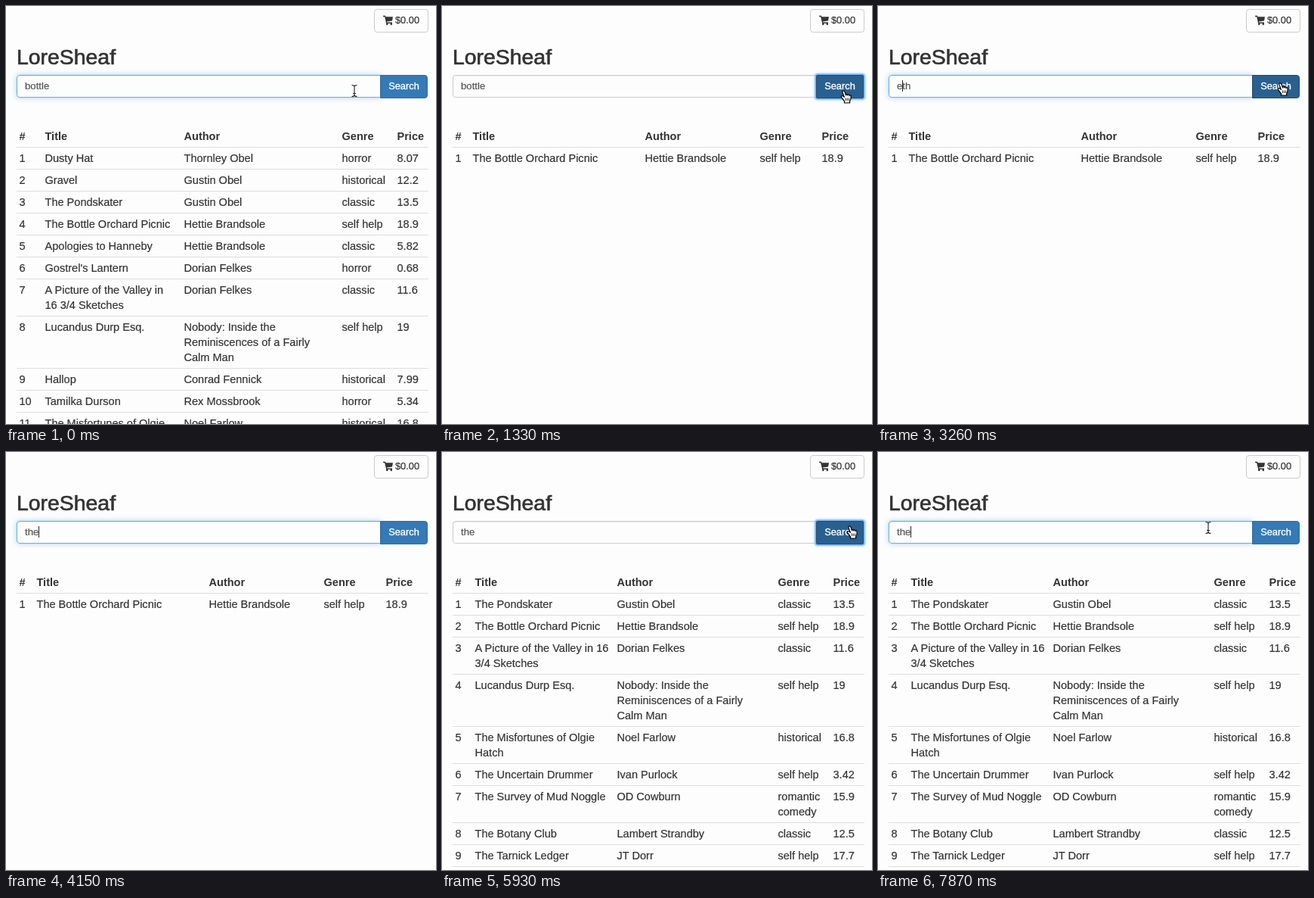
An HTML page that plays this animation: 569x552 px, repeating every 8 s.

```html
<!DOCTYPE html>
<html lang="en">
<head>
<meta charset="utf-8">
<title>Book search</title>
<style>
  html, body { margin: 0; width: 100%; height: 100%; overflow: hidden; background: #fdfdfd; }
  body { position: relative; color: #333; font: 14.55px/20px "Liberation Sans", Arial, sans-serif; -webkit-text-stroke: .2px; }
  body > * { position: absolute; box-sizing: border-box; }
  h1 { left: 14px; top: 51px; margin: 0; font-size: 28.4px; line-height: 32px; font-weight: 400; -webkit-text-stroke: .7px; }
  #cart { left: 487px; top: 4px; width: 72px; height: 31px; border: 1px solid #ccc; border-radius: 4px; font-size: 12.8px; line-height: 28px; padding-left: 27px; }
  #cart svg { position: absolute; left: 11px; top: 7px; }
  #field { left: 14px; top: 91px; width: 482px; height: 30px; border: 1px solid #ccc; border-radius: 4px 0 0 4px; padding-left: 10px; color: #555; font-size: 13.2px; line-height: 28px; white-space: pre; box-shadow: inset 0 1px 1px rgba(0,0,0,.075); }
  #field.focus { border-color: #66afe9; box-shadow: inset 0 1px 1px rgba(0,0,0,.075), 0 0 7px rgba(102,175,233,.6); }
  #field i { position: absolute; top: 6px; width: 1px; height: 15px; background: #222; }
  #button { left: 495px; top: 91px; width: 63px; height: 31px; border: 1px solid #2e6da4; border-radius: 0 4px 4px 0; background: #337ab7; color: #fff; font-size: 12.8px; line-height: 28px; text-align: center; -webkit-text-stroke: .35px; }
  #button.hover { background: #286090; border-color: #204d74; }
  #button.active { background: #204d74; border-color: #1a3f60; }
  #button.ring { border-radius: 2px; box-shadow: 0 0 0 1.5px #7ab8f5, 0 0 3px 2px #8cc3f8; }
  .table { left: 14px; top: 158px; width: 545px; }
  .row { display: grid; padding: 4px 0 4px 3.5px; border-top: 1px solid #ddd; }
  .row:first-child { border: 0; font-weight: 700; -webkit-text-stroke: 0; }
  .row span { padding-right: 8px; }
  .row span:last-child { padding: 0; }
  #blank { left: 0; top: 242px; width: 100%; height: 251px; background: #fdfdfd; }
  #pointer { left: 0; top: 0; overflow: visible; }
</style>
</head>
<body>
<div id="cart">
  <svg width="14" height="14" viewBox="0 0 14 14" fill="#333">
    <path d="M0 .8H3L3.5 2.2H13L12 7.6 5 8.4 5.3 9.6H12V11H4.2L2.1 2.2H0z"/>
    <circle cx="5.3" cy="12" r="1.3"/><circle cx="10.8" cy="12" r="1.3"/>
  </svg>$0.00
</div>
<h1>LoreSheaf</h1>
<div id="field"></div>
<div id="button">Search</div>
<div id="blank"></div>
<svg id="pointer" width="1" height="1">
  <g id="hand"><path d="M4.2.8C3 .8 2.6 1.8 3 2.9L5.2 9 3.6 7.9C2 7 .6 8.3 1.6 9.7L5.5 14.8V17H12.6V15L14 11.2V7.6C14 6.4 12.5 6.2 12 7.1 11.8 5.8 10.2 5.6 9.7 6.6 9.3 5.4 7.8 5.5 7.4 6.4L5.8 2C5.5 1.2 5 .8 4.2.8Z" fill="#fff" stroke="#000" stroke-width="1.2"/><path d="M7.5 10.5V14M9.5 10.5V14M11.5 10.5V14" stroke="#000" stroke-width=".8"/></g>
  <g id="beam"><path d="M-3.5-7.5Q0-7.5 0-5.5V5.5Q0 7.5-3.5 7.5M3.5-7.5Q0-7.5 0-5.5M0 5.5Q0 7.5 3.5 7.5M-2 3.5H2" fill="none" stroke="#222" stroke-width="1.1"/></g>
  <g id="arrow"><path d="M0 0V13.5L3.1 10.6 5.2 15.5 7.4 14.5 5.3 9.8H9.5Z" stroke="#fff"/></g>
</svg>
<script>
const $ = id => document.getElementById(id);
const LOOP = 8000;

const pond = ["The Pondskater", "Gustin Obel", "classic", "13.5"];
const bottle = ["The Bottle Orchard Picnic", "Hettie Brandsole", "self help", "18.9"];
const valley = ["A Picture of the Valley in 16 3/4 Sketches", "Dorian Felkes", "classic", "11.6"];
const nobody = ["Lucandus Durp Esq.", "Nobody: Inside the Reminiscences of a Fairly Calm\u00a0Man", "self help", "19"];
const olgie = ["The Misfortunes of Olgie Hatch", "Noel Farlow", "historical", "16.8"];

const tables = {
  all: makeTable([34, 184, 209, 73], [
    ["Dusty Hat", "Thornley Obel", "horror", "8.07"],
    ["Gravel", "Gustin Obel", "historical", "12.2"],
    pond, bottle,
    ["Apologies to Hanneby", "Hettie Brandsole", "classic", "5.82"],
    ["Gostrel's Lantern", "Dorian Felkes", "horror", "0.68"],
    valley, nobody,
    ["Hallop", "Conrad Fennick", "historical", "7.99"],
    ["Tamilka Durson", "Rex Mossbrook", "horror", "5.34"],
    olgie
  ]),
  bottle: makeTable([23, 228, 152, 82], [bottle]),
  the: makeTable([26, 188, 213, 73], [
    pond, bottle, valley, nobody, olgie,
    ["The Uncertain Drummer", "Ivan Purlock", "self help", "3.42"],
    ["The Survey of Mud Noggle", "OD Cowburn", "romantic comedy", "15.9"],
    ["The Botany Club", "Lambert Strandby", "classic", "12.5"],
    ["The Tarnick Ledger", "JT Dorr", "self help", "17.7"],
    ["The Late Ferry", "Ivan Purlock", "classic", "9.2"]
  ])
};

function makeTable(columns, books) {
  const table = document.createElement("div");
  table.className = "table";
  const rows = [["#", "Title", "Author", "Genre", "Price"], ...books.map((book, i) => [i + 1, ...book])];
  for (const cells of rows) {
    const row = document.createElement("div");
    row.className = "row";
    row.style.gridTemplateColumns = columns.map(w => w + "px").join(" ") + " auto";
    for (const cell of cells) {
      const span = document.createElement("span");
      span.textContent = cell;
      row.append(span);
    }
    table.append(row);
  }
  document.body.insertBefore(table, $("blank"));
  return table;
}

// Each step changes only the listed parts of the state before it.
const steps = [
  [0, { table: "all", text: "bottle", caret: -1, focus: true, button: "", blank: false, pointer: ["beam", 461, 112] }],
  [150, { button: "hover", pointer: ["hand", 513, 113] }],
  [300, { pointer: ["hand", 533, 115] }],
  [440, { button: "active ring" }],
  [590, { blank: true }],
  [740, { blank: false, table: "bottle", focus: false, button: "hover ring" }],
  [1330, { pointer: ["hand", 527, 111] }],
  [1480, { pointer: ["hand", 504, 104] }],
  [1630, { button: "ring", pointer: ["beam", 466, 102] }],
  [1770, { pointer: ["beam", 443, 99] }],
  [1920, { focus: true, button: "" }],
  [2070, { caret: 0 }],
  [2220, { pointer: ["beam", 457, 102] }],
  [2660, { text: "t", caret: 1, pointer: null }],
  [2810, { text: "th", caret: 0 }],
  [2960, { text: "eth", caret: 1 }],
  [3260, { button: "hover", pointer: ["hand", 528, 101] }],
  [3400, { button: "", caret: -1, pointer: null }],
  [3850, { text: "th", caret: 0 }],
  [4000, { caret: 2 }],
  [4150, { text: "the", caret: 3 }],
  [4600, { caret: -1 }],
  [5190, { pointer: ["hand", 567, 116] }],
  [5340, { button: "hover", pointer: ["hand", 542, 103] }],
  [5490, { pointer: ["hand", 535, 97] }],
  [5630, { button: "active ring" }],
  [5780, { focus: false }],
  [5930, { table: "the", button: "hover ring" }],
  [6980, { pointer: ["hand", 526, 103] }],
  [7130, { button: "ring", pointer: ["arrow", 484, 124] }],
  [7270, { pointer: ["beam", 437, 100] }],
  [7720, { focus: true, button: "" }],
  [7870, { caret: 3 }]
];

function show({ table, text, caret, focus, button, blank, pointer }) {
  for (const name in tables) tables[name].style.display = name === table ? "" : "none";
  $("field").className = focus ? "focus" : "";
  $("field").replaceChildren(...(caret < 0 ? [text] : [text.slice(0, caret), document.createElement("i"), text.slice(caret)]));
  $("button").className = button;
  $("blank").style.display = blank ? "" : "none";
  for (const kind of ["hand", "beam", "arrow"]) {
    const visible = pointer && pointer[0] === kind;
    $(kind).style.display = visible ? "" : "none";
    if (visible) $(kind).setAttribute("transform", `translate(${pointer[1]} ${pointer[2]})`);
  }
}

let shown = 0;
function tick() {
  const time = performance.now() % LOOP;
  const count = steps.filter(([start]) => start <= time).length;
  if (count !== shown) {
    shown = count;
    show(Object.assign({}, ...steps.slice(0, count).map(([, change]) => change)));
  }
  requestAnimationFrame(tick);
}
tick();
</script>
</body>
</html>
```
